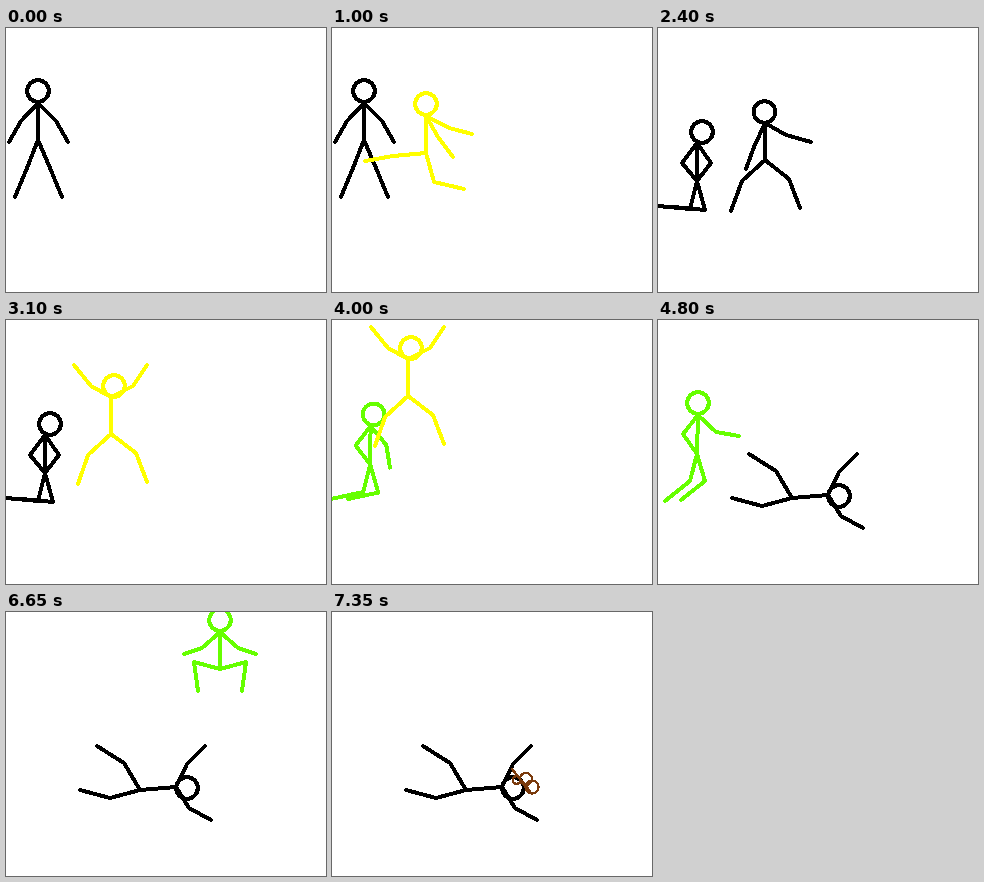
Recreate the animation shown at these times as an HTML page. Size 320 by 264 pixels, loop 7.45 s.

```html
<!DOCTYPE html>
<html lang="en">
<head>
<meta charset="utf-8">
<title>Stick fight</title>
<style>
  html, body { margin: 0; width: 100%; height: 100%; overflow: hidden; background: #fff; }
  svg { display: block; width: 320px; height: 264px; }
  g { fill: none; stroke-width: 4; stroke-linecap: round; stroke-linejoin: round; }
  #drop { stroke: #7a3a0c; stroke-width: 2.4; }
</style>
</head>
<body>
<svg viewBox="0 0 320 264" shape-rendering="crispEdges">
  <g id="left"><path/><circle r="10.8"/></g>
  <g id="right"><path/><circle r="10.8"/></g>
  <g id="drop">
    <path d="M180 157L198 179"/>
    <circle cx="184.5" cy="168" r="3.8"/>
    <circle cx="194" cy="167" r="6"/>
    <circle cx="200" cy="175" r="6.5"/>
  </g>
</svg>
<script>
const LOOP = 7450;
const BLACK = '#000', YELLOW = '#ff0', GREEN = '#6f0';

// Joints: neck, head, hip, elbow+hand A, elbow+hand B, knee+foot A, knee+foot B
const PARENT = [0, 0, 0, 0, 3, 0, 5, 2, 7, 2, 9];

// Each joint becomes a bone with an angle and a length from its parent
function pose(text) {
  const p = text.split(' ').map(s => s.split(',').map(Number));
  return p.map(([x, y], i) => {
    const [px, py] = p[PARENT[i]];
    return { angle: Math.atan2(y - py, x - px), len: Math.hypot(x - px, y - py) };
  });
}

const stand = pose('32,75 32,63 32,112 15,93 3,114 50,93 62,114 21,140 9,169 44,140 56,169');
const kick = pose('94,88 94,76 94,125 106,109 121,129 117,100 140,106 61,128 33,133 102,154 132,161');
const hop = pose('33,50 33,38 33,90 16,67 19,92 47,70 36,94 22,116 10,144 45,116 57,144');
const guard = pose('93,97 92.5,86 93,134 82,121 74,143 114,109 139,116 70,155 59,185 117,153 128,182');
const kneel = pose('39,115 44,104 39,153 24,135 39,153 53,135 39,153 32,181 0,178 47,182 16,179');
const leap = pose('105,77 108,66 105,114 85,66 68,45 127,66 141,45 82,135 72,164 130,133 141,162');
const ready = pose('40,95 40,83 39,134 25,114 39,134 58,112 81,116 32,161 7,181 47,161 23,180');
const lying = pose('170,175 181,176 134,178 183,196 205,208 181,152 199,134 118,151 91,134 104,186 74,178');
const soar = pose('148,32 158,25 118,53 166,15 187,5 168,22 187,9 92,68 66,84 94,75 68,93');
const hover = pose('269,53 272,43 258,90 246,45 250,21 294,52 307,31 233,105 225,136 260,121 237,142');
const squat = pose('198,30 198,18 198,67 180,46 162,52 216,46 234,52 172,60 176,89 224,60 220,89');

// Time, pose, neck x, neck y, colour from then on
const leftTrack = [
  [0, stand, 32, 75, BLACK],
  [1100, stand, 32, 75, BLACK],
  [1600, hop, 33, 54, BLACK],
  [1800, hop, 33, 50, BLACK],
  [2000, hop, 34, 36, BLACK],
  [2400, kneel, 39, 115, BLACK],
  [3400, kneel, 39, 115, BLACK],
  [3800, kneel, 39, 112, GREEN],
  [4300, ready, 38, 97, GREEN],
  [4800, ready, 40, 95, GREEN],
  [5600, soar, 148, 32, GREEN],
  [6000, hover, 269, 53, GREEN],
  [6350, hover, 370, 25, GREEN],
  [6351, squat, 226, -95, GREEN],
  [6650, squat, 214, 20, GREEN],
  [6850, squat, 198, 30, GREEN],
  [7150, squat, 198, 30, GREEN],
  [7250, squat, 198, -22, GREEN],
  [7350, squat, 198, -100, GREEN],
];
const rightTrack = [
  [0, leap, 375, 70, YELLOW],
  [400, leap, 235, 65, YELLOW],
  [800, kick, 95, 87, YELLOW],
  [1000, kick, 94, 88, YELLOW],
  [1300, kick, 96, 88, BLACK],
  [1800, guard, 93, 97, BLACK],
  [2100, guard, 93, 97, BLACK],
  [2400, guard, 107, 95, BLACK],
  [2500, guard, 105, 92, YELLOW],
  [2800, leap, 97, 61, YELLOW],
  [3100, leap, 105, 77, YELLOW],
  [3200, leap, 105, 77, YELLOW],
  [3600, leap, 88, 34, YELLOW],
  [4000, leap, 76, 39, YELLOW],
  [4300, kick, 88, 88, YELLOW],
  [4400, kick, 94, 92, BLACK],
  [4800, lying, 170, 175, BLACK],
];

const mix = (a, b, k) => a + (b - a) * k;
const turn = (a, b, k) => a + Math.atan2(Math.sin(b - a), Math.cos(b - a)) * k;

function joints(track, t) {
  const i = track.findLastIndex(key => key[0] <= t);
  const [t0, p0, x0, y0, color] = track[i];
  const [t1, p1, x1, y1] = track[i + 1] || track[i];
  const k = t1 > t0 ? (t - t0) / (t1 - t0) : 0;
  const pts = [[mix(x0, x1, k), mix(y0, y1, k)]];
  for (let j = 1; j < PARENT.length; j++) {
    const [x, y] = pts[PARENT[j]];
    const angle = turn(p0[j].angle, p1[j].angle, k);
    const len = mix(p0[j].len, p1[j].len, k);
    pts.push([x + len * Math.cos(angle), y + len * Math.sin(angle)]);
  }
  return { pts, color };
}

const line = (pts, ids) => 'M' + ids.map(i => pts[i].map(v => v.toFixed(2)).join(' ')).join('L');

function drawFigure(id, track, t) {
  const g = document.getElementById(id);
  const { pts, color } = joints(track, t);
  const [path, head] = g.children;
  g.setAttribute('stroke', color);
  path.setAttribute('d', line(pts, [4, 3, 0, 5, 6]) + line(pts, [0, 2]) + line(pts, [8, 7, 2, 9, 10]));
  head.setAttribute('cx', pts[1][0]);
  head.setAttribute('cy', pts[1][1]);
}

function drawDrop(t) {
  const drop = document.getElementById('drop');
  const k = Math.min(1, (t - 6850) / 300);
  drop.style.display = k < 0 ? 'none' : '';
  drop.setAttribute('transform', `translate(${6 * (1 - k)} ${-90 * (1 - k)})`);
}

// Poses hold for 100 ms, with one short 50 ms hold before 6350
function hold(t) {
  const shift = t < 6350 ? 0 : 50;
  return Math.floor((t - shift) / 100) * 100 + shift;
}

const start = performance.now();
function frame() {
  const t = hold((performance.now() - start) % LOOP);
  drawFigure('left', leftTrack, t);
  drawFigure('right', rightTrack, t);
  drawDrop(t);
  requestAnimationFrame(frame);
}
frame();
</script>
</body>
</html>
```
